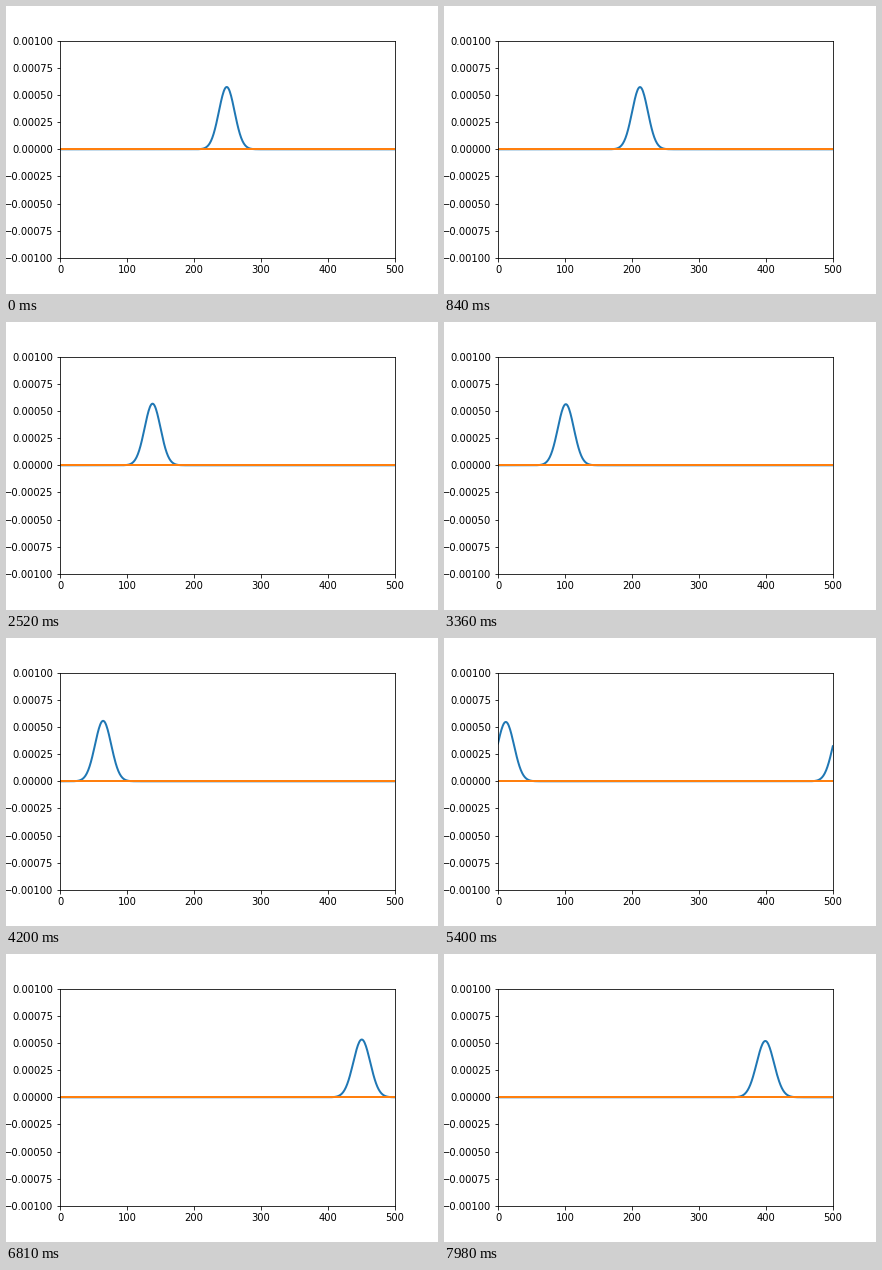
Recreate the animation shown at these times as a matplotlib script. Size 432x288 px, loop 8 s.

```python
import numpy as np
import matplotlib.pyplot as plt
from matplotlib.animation import FuncAnimation

FRAMES = 267
STEP_MS = 30
N = 500            # periodic grid
START = 248.5      # pulse centre at the beginning, in grid cells
SPEED = 1.316      # cells per frame, to the left
PEAK = 0.000573
SIGMA = 11.7
SPREAD = 562.0     # frames, time scale of the dispersion

plt.rcParams["font.family"] = "DejaVu Sans"
plt.rcParams["font.size"] = 10

fig = plt.figure(figsize=(6, 4), dpi=72, facecolor="white")
ax = fig.add_axes([0.125, 0.125, 0.775, 0.755])
ax.set_xlim(0, 500)
ax.set_ylim(-0.001, 0.001)
ax.set_yticks(np.linspace(-0.001, 0.001, 9))
ax.yaxis.set_major_formatter("{x:.5f}")
ax.set_yticklabels([f"{v:.5f}".replace("-", "\u2212")
                    for v in np.arange(-4, 5) * 0.00025])

cells = np.arange(N)
x = np.linspace(0, 500, N)
wave, = ax.plot(x, np.zeros(N), color="#1f77b4", lw=2)
ax.plot(x, np.zeros(N), color="#ff7f0e", lw=2)


def pulse(n):
    """Gaussian packet on a ring, widening as it travels."""
    growth = np.sqrt(1 + (n / SPREAD) ** 2)
    centre = START - SPEED * n
    d = (cells - centre + N / 2) % N - N / 2
    return PEAK / growth * np.exp(-0.5 * (d / (SIGMA * growth)) ** 2)


def update(n):
    wave.set_ydata(pulse(n))
    return wave,


def init():
    return update(0)


anim = FuncAnimation(fig, update, frames=FRAMES, init_func=init,
                     interval=STEP_MS, repeat=True, repeat_delay=0)
plt.show()
```
